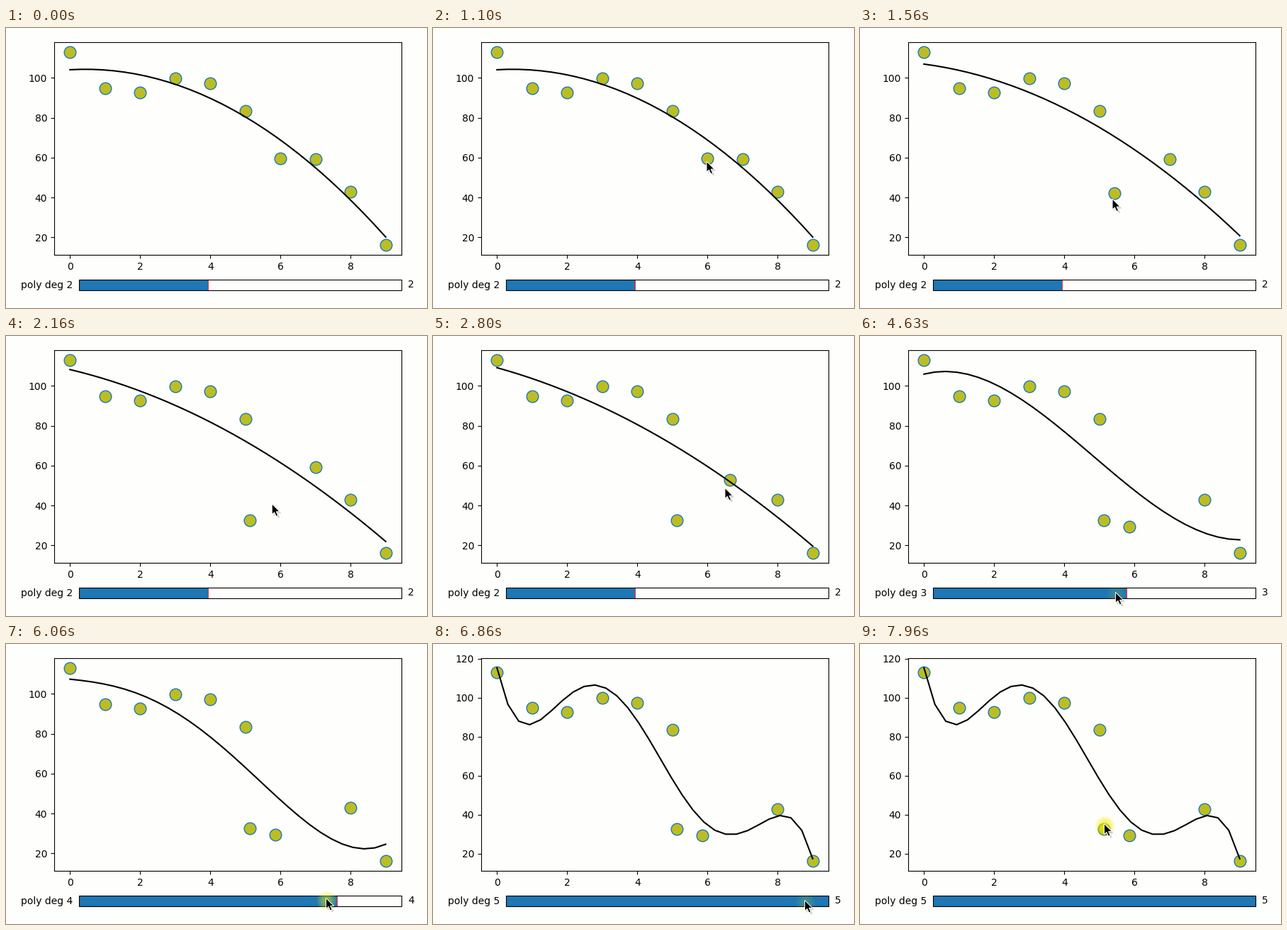
A matplotlib script for the animation above (8 s loop, 594x395 px).

```python
import numpy as np
import matplotlib.pyplot as plt
from matplotlib.animation import FuncAnimation
from matplotlib.lines import Line2D
from matplotlib.patches import Circle, Polygon, Rectangle
from matplotlib.ticker import MultipleLocator
from matplotlib.transforms import Affine2D

W, H, DPI = 594, 395, 100
LOOP, STEP = 8000, 25
BACK = "#fefefc"
BLUE, OLIVE = "tab:blue", "tab:olive"

# Plot area and slider in pixels, y pointing down
LEFT, RIGHT, TOP, BOTTOM = 68, 558, 20, 320
BAR_X, BAR_Y, BAR_W, BAR_H = 103, 355, 455, 15
MAX_DEG = 5

X0 = np.arange(10.0)
Y0 = np.array([113.1, 94.9, 92.7, 99.9, 97.4, 83.5, 59.6, 59.3, 42.9, 16.1])
GRID = np.linspace(0, 9, 30)

# Pointer strokes: start, end, goal x, goal y, sideways bow
ORIGIN = np.array([536.0, 280.0])
STROKES = [
    (460, 1030, 387, 184, 0),
    (1080, 1980, 344, 260, 0),
    (2060, 2480, 437, 185, 0),
    (2590, 3330, 389, 257, -6),
    (3430, 3680, 380, 269, 0),
    (3800, 4400, 360, 360, 0),
    (5060, 5630, 418, 356, 9),
    (5800, 5940, 451, 357, 0),
    (6180, 6540, 524, 360, 0),
    (7260, 7880, 344, 252, 0),
]
PRESSES = [1030, 2500, 4340, 5920, 6640, 7900]
DRAGS = {6: (1080, 1980), 7: (2590, 3680)}   # point: grab, release
LAG = 70

ARROW = np.array([(0, 0), (0, 15), (3.4, 12), (6, 17.6),
                  (8.6, 16.5), (6.1, 11), (11, 11)]) + (0.5, 1.5)


def pointer(t):
    pos = ORIGIN
    for start, end, x, y, bow in STROKES:
        if t < start:
            break
        f = np.sin(np.pi / 2 * min(1, (t - start) / (end - start)))
        d = np.array([x, y]) - pos
        side = np.array([d[1], -d[0]]) / np.hypot(*d)
        pos = pos + f * d + bow * np.sin(np.pi * f) * side
    return pos


def degree(t):
    """The last press on the slider sets the degree."""
    deg = 2
    for press in PRESSES:
        x, y = pointer(press)
        if press <= t and y > BAR_Y:
            deg = round(MAX_DEG * (x - BAR_X) / BAR_W)
    return deg


def glow_level(t):
    """Flash on a press, then a faint rest until the pointer leaves."""
    for press in PRESSES:
        leave = min([s[0] for s in STROKES if s[0] > press], default=LOOP)
        if press <= t < leave:
            return max(0.12, 1 - (t - press) / 250)
    return 0


def limits(values):
    lo, hi = min(values), max(values)
    pad = 0.05 * (hi - lo)
    return lo - pad, hi + pad


XLIM, YLIM = limits(X0), limits(Y0)


def to_data(px):
    return (np.interp(px[0], (LEFT, RIGHT), XLIM),
            np.interp(px[1], (TOP, BOTTOM), YLIM[::-1]))


def points(t):
    x, y = X0.copy(), Y0.copy()
    for i, (grab, release) in DRAGS.items():
        if t - LAG > grab:
            x[i], y[i] = to_data(pointer(min(t - LAG, release)))
    return x, y


plt.rcParams["font.family"] = "DejaVu Sans"
fig = plt.figure(figsize=(W / DPI, H / DPI), dpi=DPI, facecolor=BACK)
ax = fig.add_axes([LEFT / W, 1 - BOTTOM / H, (RIGHT - LEFT) / W,
                   (BOTTOM - TOP) / H], facecolor=BACK)
ax.set_xlim(XLIM)
ax.xaxis.set_major_locator(MultipleLocator(2))
ax.yaxis.set_major_locator(MultipleLocator(20))
dots, = ax.plot(X0, Y0, "o", ms=12, mfc=OLIVE, mec=BLUE, mew=1)
curve, = ax.plot([], [], "k", lw=1.5)

pixels = Affine2D().scale(1 / W, -1 / H).translate(0, 1) + fig.transFigure


def place(artist, z):
    artist.set_transform(pixels)
    artist.set_zorder(z)
    return fig.add_artist(artist)


def bar_text(x, align):
    text = fig.text(0, 0, "", ha=align, va="center")
    text.set(transform=pixels, position=(x, BAR_Y + BAR_H / 2))
    return text


fill = place(Rectangle((BAR_X, BAR_Y), 1, BAR_H, fc=BLUE, lw=0), 2)
mark = place(Line2D([0, 0], [BAR_Y, BAR_Y + BAR_H], color="r", lw=0.8,
                    alpha=0.8), 3)
place(Rectangle((BAR_X, BAR_Y), BAR_W, BAR_H, fc="none", ec="k", lw=0.8), 4)
label = bar_text(BAR_X - 0.02 * BAR_W, "right")
value = bar_text(BAR_X + 1.02 * BAR_W, "left")

glow = [place(Circle((0, 0), r, fc="#f4f000", lw=0), 5)
        for r in np.linspace(4, 14, 8)]
shadow = [place(Polygon(ARROW, fc="k", lw=0, alpha=0.12), 6) for _ in range(2)]
arrow = place(Polygon(ARROW, fc="k", ec="w", lw=0.7), 7)


def update(frame):
    t = frame * STEP
    x, y = points(t)
    deg = degree(t)
    fit = np.polyval(np.polyfit(x, y, deg), GRID)
    dots.set_data(x, y)
    curve.set_data(GRID, fit)
    ax.set_ylim(limits(np.append(y, fit)))

    width = BAR_W * deg / MAX_DEG
    fill.set_width(width)
    mark.set_xdata([BAR_X + width] * 2)
    label.set_text(f"poly deg {deg}")
    value.set_text(str(deg))

    tip = pointer(t)
    for k, shape in enumerate([arrow] + shadow):
        shape.set_xy(ARROW + tip + 1.4 * k)
        shape.set_visible(t >= STROKES[0][0])
    level = glow_level(t)
    for ring in glow:
        ring.set_center(tip + (1.5, 5))
        ring.set_alpha(0.17 * level)
        ring.set_visible(level > 0)
    return ()


anim = FuncAnimation(fig, update, frames=LOOP // STEP, interval=STEP,
                     repeat=True, repeat_delay=0, init_func=lambda: ())
plt.show()
```
